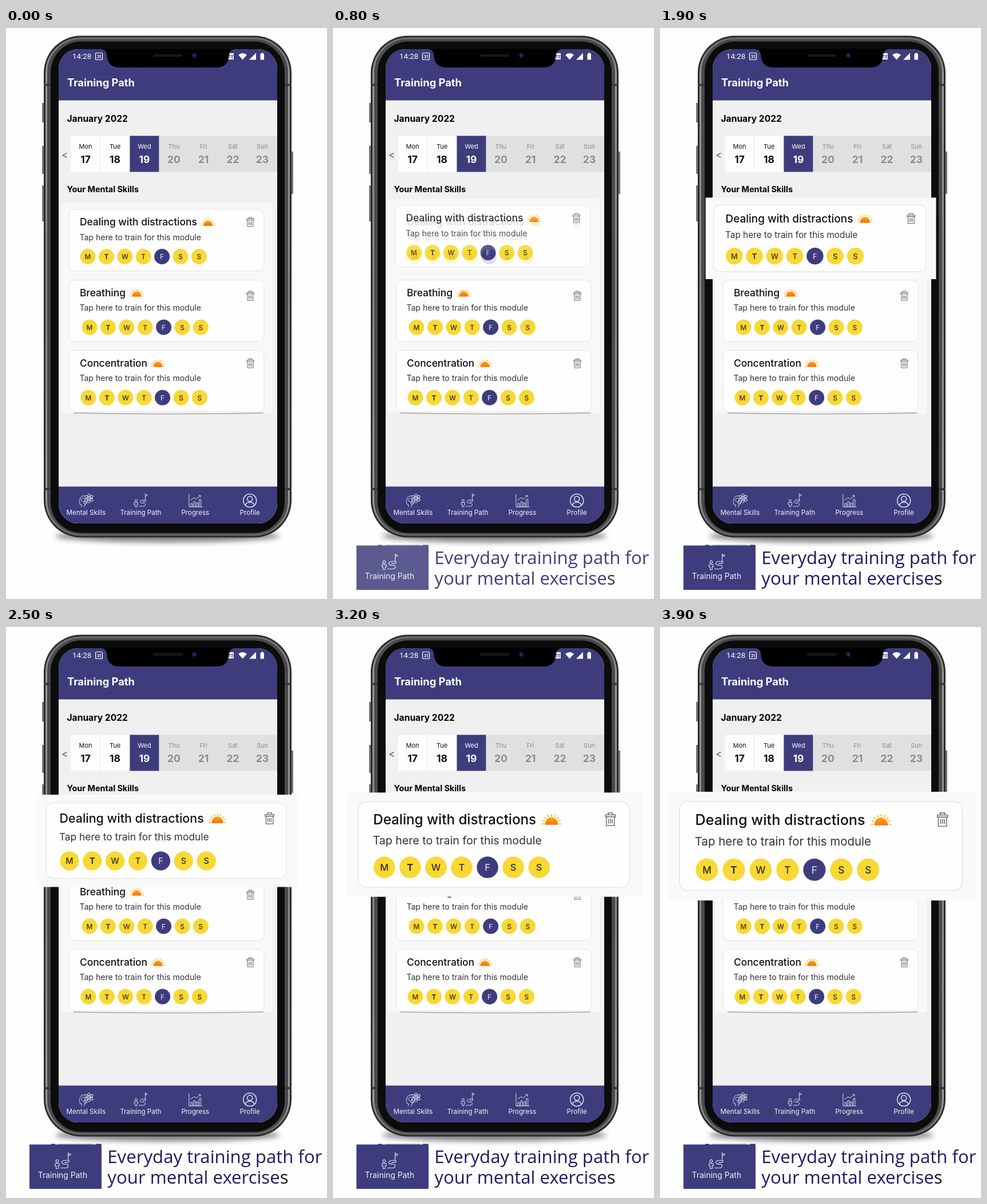
Animation of 561x998 px, one loop 4 s. Source, as an HTML page:

```html
<!DOCTYPE html>
<html lang="en">
<head>
<meta charset="utf-8">
<title>Training Path</title>
<style>
  html, body { margin: 0; width: 100%; height: 100%; overflow: hidden; background: #fdfefd; }
  svg { display: block; width: 561px; height: 998px; font-family: Inter, sans-serif; }
  .mid { text-anchor: middle; }
  .line { fill: none; stroke: #e0e0ee; stroke-width: .95; stroke-linecap: round; stroke-linejoin: round; }
  .caption { font: 31.15px "Open Sans", sans-serif; fill: #1f1a63; }
</style>
</head>
<body>
<svg id="stage" viewBox="0 0 561 998">
  <defs>
    <linearGradient id="metal" x2="0" y2="1">
      <stop offset="0" stop-color="#6e6e6e"/><stop offset=".08" stop-color="#9a9a98"/>
      <stop offset=".5" stop-color="#868684"/><stop offset=".93" stop-color="#9a9a98"/>
      <stop offset="1" stop-color="#666"/>
    </linearGradient>
    <linearGradient id="sunFill" x2="0" y2="1">
      <stop offset="0" stop-color="#ffa51c"/><stop offset="1" stop-color="#f97300"/>
    </linearGradient>
    <filter id="soft" x="-10%" y="-100%" width="120%" height="300%"><feGaussianBlur stdDeviation="5"/></filter>
    <clipPath id="screen"><rect x="92" y="37" width="382" height="829" rx="34"/></clipPath>

    <g id="sun">
      <path d="M-8.2 6A8.2 9.5 0 0 1 8.2 6Z" fill="url(#sunFill)"/>
      <path id="rays" stroke="#fcbf2c" stroke-width="1.5" stroke-linecap="round"/>
    </g>
    <g id="trash" fill="none" stroke="#5c5c5c" stroke-width=".95">
      <path d="M-6.2 -5.5H6.2V-3H-6.2ZM-2.8 -5.5V-8H2.8V-5.5M-5 -3V8H5V-3M-2.3 -.5V5.5M0 -.5V5.5M2.3 -.5V5.5"/>
    </g>

    <g id="mind" class="line">
      <path d="M-8 11V7H-10Q-12 7 -11 3L-12.5 1.5L-11 -1Q-11 -8 -3 -8.5M-3 11V8Q2 6 2 2"/>
      <circle cx="-5" cy="-1" r="3.2" stroke-dasharray="2 1"/><circle cx="-2" cy="4" r="2"/>
      <ellipse cx="5" cy="-4" rx="3" ry="8"/>
      <ellipse cx="5" cy="-4" rx="3" ry="8" transform="rotate(60 5 -4)"/>
      <ellipse cx="5" cy="-4" rx="3" ry="8" transform="rotate(120 5 -4)"/>
      <circle cx="5" cy="-4" r="1.3"/>
    </g>
    <g id="path" class="line">
      <circle cx="-8" cy="0" r="2"/>
      <path d="M-11 3.5H-5V7H-6.5V11H-9.5V7H-11ZM-3 10H5Q9 9 8 6Q7 4 3 4.5Q-2 4 -1 1Q0 -1 4 -1H9Q10 2 6 2H3M8 -1V-12M8 -11.5L12 -9.5L8 -7.5"/>
    </g>
    <g id="chart" class="line">
      <path d="M-11 -11V11H12M-8 11V5H-5V11M-3 11V2H0V11M2 11V4H5V11M7 11V-2H10V11M-8 -1L-2 -5L2 -3L9 -9M6 -9H9V-6"/>
    </g>
    <g id="person" class="line">
      <g stroke-width="1.5"><circle r="11.5"/><circle cy="-3" r="4.5"/><path d="M-7.5 8Q-7 3 0 3T7.5 8"/></g>
    </g>
  </defs>

  <ellipse cx="282" cy="888" rx="196" ry="11" fill="#333" opacity=".6" filter="url(#soft)"/>
  <path d="M65 131V165M65 206V255M65 275V338M500 216V290" stroke="#77777a" stroke-width="4"/>
  <rect x="66" y="13.5" width="433" height="877" rx="65" fill="#2b2b2b"/>
  <rect x="70.5" y="18" width="424" height="868" rx="60.5" fill="#4a4a4a" stroke="url(#metal)" stroke-width="3"/>
  <rect x="78" y="23.500" width="409" height="859" rx="54" fill="#0c0c0c"/>
  <path d="M66 99.5H78M487 99.5H499M66 806H78M487 806H499" stroke="#3a3a3a" stroke-width="4"/>

  <g clip-path="url(#screen)">
    <rect x="92" y="37" width="382" height="829" fill="#eff0ef"/>
    <path d="M92 37H474V126.5H92ZM92 801.5H474V866H92Z" fill="#3e3c7d"/>
    <rect x="96" y="306" width="370" height="367" fill="#f7f8f7"/>
    <g fill="#fff">
      <text x="116" y="54" font-family="Roboto, sans-serif" font-size="13.3">14:28</text>
      <rect x="156.5" y="43.5" width="12" height="12" rx="2" fill="none" stroke="#fff" stroke-width="1.2"/>
      <text class="mid" x="162.5" y="52.5" font-size="7" font-weight="700">31</text>
      <rect x="386" y="44" width="12" height="11"/>
      <text x="389" y="52.5" font-size="7" font-weight="700" fill="#3e3c7d">TE</text>
      <path d="M406 47Q413.5 41 421 47L413.5 55.5ZM437 43.5V55.5H425ZM444.5 45H446V43.5H449.5V45H451V55.5H444.5Z"/>
      <text x="107" y="101.5" font-size="18.3" font-weight="700">Training Path</text>
    </g>
    <text x="106.5" y="164" font-size="15.6" font-weight="700">January 2022</text>
    <text x="106.5" y="287" font-size="14.4" font-weight="700">Your Mental Skills</text>
    <text x="97" y="227.5" font-size="17" fill="#555">&lt;</text>
    <g id="days"></g>
    <path d="M118 673Q284 676 450 673" fill="none" stroke="#a6a6a6" stroke-width="1.6"/>
    <g id="cards"></g>
    <g id="nav"></g>
  </g>
  <path d="M164 36.5Q175 37 176 46Q177 69 198 69H368Q389 69 390 46Q391 37 402 36.5Z"/>
  <rect x="257" y="45.5" width="51" height="5" rx="2.5" fill="#171717"/>
  <circle cx="329" cy="48" r="5" fill="#101026"/><circle cx="329" cy="48" r="2.5" fill="#2a2a78"/>

  <g id="banner">
    <path d="M79 904.5H86M157 904.5H166" stroke="#222" stroke-width="2"/>
    <path d="M92 904H152" stroke="#777" stroke-width="1"/>
    <rect x="41" y="904.5" width="126" height="77.5" fill="#3e3c7d"/>
    <g id="badge" transform="translate(99 933.5) scale(1.2)"></g>
    <text class="caption" x="177.3" y="936.5">Everyday training path for</text>
    <text class="caption" x="177.3" y="972.5">your mental exercise<tspan fill="#151515">s</tspan></text>
  </g>
  <g id="popup"></g>
</svg>
<script>
const $ = id => document.getElementById(id);

$('rays').setAttribute('d', Array.from({ length: 9 }, (_, i) => {
  const a = Math.PI * (1 + i / 8), at = r => `${r * Math.cos(a)} ${5 + r * Math.sin(a)}`;
  return `M${at(10)}L${at(11.6)}`;
}).join(''));

$('days').innerHTML = ['Mon', 'Tue', 'Wed', 'Thu', 'Fri', 'Sat', 'Sun'].map((day, i) => {
  const x = 113.5 + i * 51.5, today = i === 2, past = i < 2;
  const ink = today ? '#fff' : past ? '#111' : '#8c8c8c';
  return `<rect x="${x}" y="188.5" width="51" height="63" fill="${today ? '#3e3c7d' : past ? '#fdfdfd' : '#dfe0df'}"/>
    <path d="M${x + 51.25} 189V251" stroke="#cfcfcf" stroke-width=".7" stroke-dasharray="2 1"/>
    <g class="mid" fill="${ink}"><text x="${x + 25.5}" y="211" font-size="11">${day}</text>
    <text x="${x + 25.5}" y="235.5" font-size="17.5" font-weight="700">${17 + i}</text></g>`;
}).join('');

function card(title, top, sunX, dotX, trashY) {
  const dots = [...'MTWTFSS'].map((letter, i) => {
    const x = dotX + i * 32.4, active = i === 4;
    return `<circle cx="${x}" cy="${top + 82.5}" r="13.5" fill="${active ? '#3e3c7d' : '#f8d835'}"/>
      <text class="mid" x="${x}" y="${top + 87}" font-size="11.8" font-weight="${i === 1 ? 700 : 500}"
        fill="${active ? '#d3d2ee' : '#332f18'}">${letter}</text>`;
  }).join('');
  return `<rect x="110" y="${top}" width="341" height="107.5" rx="10" fill="#fdfefd" stroke="#e2e3e2"/>
    <text x="128.9" y="${top + 28.3}" font-size="17.4" font-weight="500" fill="#111">${title}</text>
    <text x="128.4" y="${top + 53.7}" font-size="14.1" fill="#333">Tap here to train for this module</text>
    <use href="#sun" x="${sunX}" y="${top + 23}"/><use href="#trash" x="427" y="${top + trashY}"/>${dots}`;
}

const distractions = card('Dealing with distractions', 317, 353, 143, 22);
$('cards').innerHTML = distractions + card('Breathing', 440.5, 228.5, 146, 27.5) + card('Concentration', 563.5, 265.5, 144, 22.5);
$('popup').innerHTML = '<rect x="96.8" y="305.5" width="370.4" height="131" fill="#f8f9f8"/>' + distractions;

const tab = (icon, label) => `<use href="#${icon}"/><text class="mid" y="24.5" font-size="11.6" fill="#f1f1f8">${label}</text>`;
$('nav').innerHTML = [['mind', 'Mental Skills'], ['path', 'Training Path'], ['chart', 'Progress'], ['person', 'Profile']]
  .map((item, i) => `<g transform="translate(${140 + i * 95.4} 826)">${tab(...item)}</g>`).join('');
$('badge').innerHTML = tab('path', 'Training Path');

const clamp = v => Math.max(0, Math.min(1, v));

function draw(now) {
  const t = Math.floor(now % 4000 / 100) * 100; // ten steps a second
  const grow = (1 - Math.cos(Math.PI * clamp((t - 1100) / 2750))) / 2;
  const fade = clamp(t / 950);
  $('banner').setAttribute('opacity', fade);
  $('popup').setAttribute('opacity', fade);
  $('popup').setAttribute('transform', `translate(${-1.5 - 123.9 * grow} ${-7 - 148 * grow}) scale(${1 + 0.45 * grow})`);
}

const start = performance.now();
function tick() {
  draw(performance.now() - start);
  requestAnimationFrame(tick);
}
tick();
</script>
</body>
</html>
```
